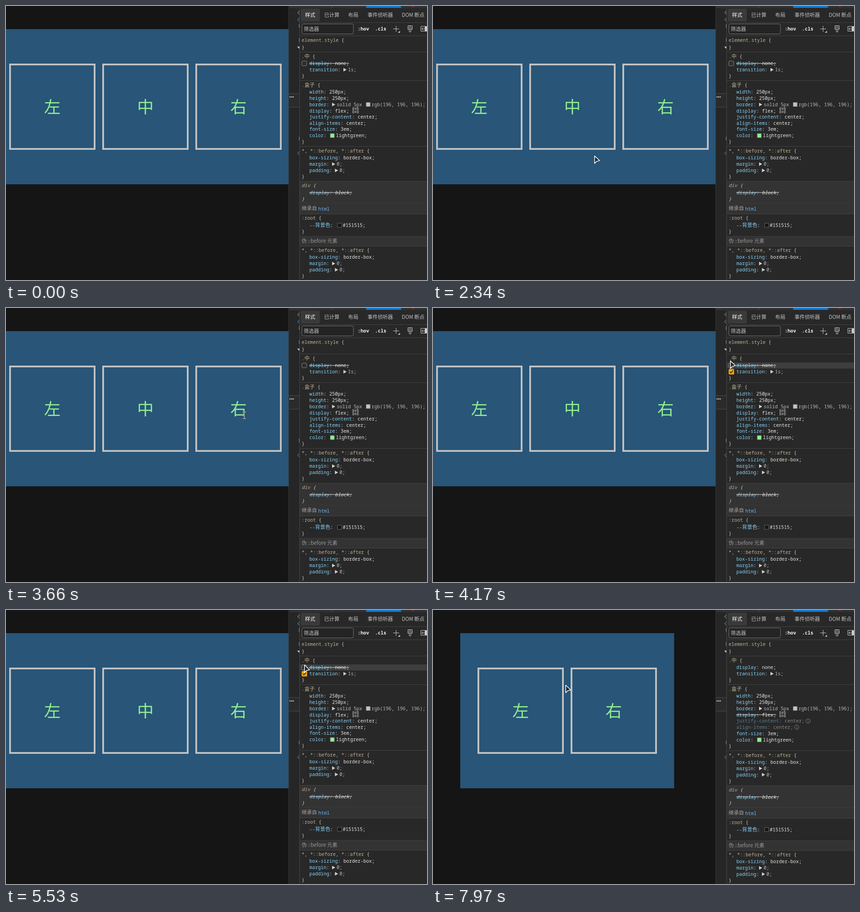
Write an HTML page that moves like this. It is 927 by 604 pixels and loops after 8000 ms.

```html
<!DOCTYPE html>
<html lang="zh">
<head>
<meta charset="utf-8">
<title>Flex boxes</title>
<style>
html, body { margin: 0; width: 100%; height: 100%; overflow: hidden; background: #151515; }
svg { display: block; width: 927px; height: 604px; }
text { white-space: pre; font: 10.42px "Noto Sans Mono", "Noto Sans CJK SC", monospace; }
.ui { font: 11.2px "Noto Sans CJK SC", "Open Sans", sans-serif; }
.han { font: 11.2px "Noto Sans CJK SC", sans-serif; }
.big { font: 36.4px "Noto Sans CJK SC", sans-serif; fill: #90ee90; text-anchor: middle; }
.struck { text-decoration: line-through; }
.bold { font-weight: 700; }
.italic { font-style: italic; }
.box rect { stroke: #c4c4c4; stroke-width: 3.8; fill: none; }
.green .side rect { fill: #556b2f; }
.gone .mid, .hover-only, .none-only, .none .flex-only { display: none; }
.none .none-only, .hover .hover-only { display: inline; }
.none.rest .checks, .hover .rest-only { display: none; }
.none .low { transform: translateY(.7px); }
</style>
</head>
<body>
<script>
const PROP = '#86d2f8', VALUE = '#e4e4e4', SOFT = '#b9b9b9', SELECTOR = '#c1b294', GREY = '#9a9a9a', LINE = '#434343';
const CH = 6.25, LEFT = 651, INDENT = 668;

const rect = (x, y, w, h, fill, more = '') => `<rect x="${x}" y="${y}" width="${w}" height="${h}" fill="${fill}" ${more}/>`;
const path = (d, stroke, more = '') => `<path d="${d}" fill="none" stroke="${stroke}" ${more}/>`;
const span = (s, fill, cls = '') => `<tspan fill="${fill}" class="${cls}">${s}</tspan>`;
const text = (x, y, s, fill = VALUE, cls = '') => `<text x="${x}" y="${y + 3.6}" fill="${fill}" class="${cls}">${s}</text>`;
const group = (cls, ...parts) => `<g class="${cls}">${parts.join('')}</g>`;
const divider = y => rect(647, y, 280, 1, LINE);
const arrow = (x, y) => `<path d="M${x} ${y - 4}l7 4l-7 4z" fill="#cfcfcf"/>`;
const swatch = (x, y, fill) => rect(x + .5, y - 4.5, 9, 9, fill, 'stroke="#777" stroke-width=".8"');
const close = (y, cls = '') => text(LEFT, y, '}', '#ccc', cls);
const open = (y, name, cls = '') => text(LEFT, y, span(name, SELECTOR) + span(' {', '#ccc'), VALUE, cls);

const prop = (y, name, value, cls = '') =>
  text(INDENT, y, span(name, PROP) + span(': ', VALUE) + span(value + ';', VALUE), '#ddd', cls);

function longhand(y, name, value) {
  const x = INDENT + (name.length + 2) * CH;
  return text(INDENT, y, span(name, PROP) + span(':', VALUE)) + arrow(x, y) + text(x + 10, y, value, SOFT);
}

const universal = y => open(y, '*, *::before, *::after') + prop(y + 15, 'box-sizing', 'border-box') +
  longhand(y + 29, 'margin', '0;') + longhand(y + 42.8, 'padding', '0;') + close(y + 57);

const checkbox = (y, on) => on
  ? rect(651, y - 6, 12, 12, '#ffa500', 'rx="2"') + path(`M653.6 ${y}l2.4 2.6l4.6-5`, '#222', 'stroke-width="1.6"')
  : rect(651.5, y - 5.3, 10.6, 10.6, '#2d2d2d', 'rx="2" stroke="#8b8b8b"');

const info = (x, y) => `<circle cx="${x}" cy="${y}" r="4.8" fill="none" stroke="#858585"/>` +
  path(`M${x} ${y - 2.6}v1M${x} ${y - .6}v3.4`, '#858585');

const dim = (y, name, value) => `<g opacity=".5">${prop(y, name, value)}</g>` + info(INDENT + (name.length + value.length + 3) * CH + 8, y);

function flexIcon(x, y) {
  let s = '';
  for (const row of [0, 7]) for (const col of [0, 5, 10]) {
    const thin = (col === 5);
    s += rect(x + col + .5, y + row + .5 + (thin ? .8 : 0), 2.4, thin ? 3.2 : 4.8, 'none', 'stroke="#b5b5b5" stroke-width=".9"');
  }
  return s;
}

const box = (cls, x, s) => group('box ' + cls, rect(x + 1.9, 128.9, 186.2, 186.2, 'none'),
  `<text class="big" x="${x + 95}" y="235.5">${s}</text>`);

const page = rect(0, 0, 622, 604, '#151515') +
  group('mid', rect(0, 51, 622, 342, '#285578'), box('side', 7, '左'), box('', 212, '中'), box('side', 417, '右')) +
  `<g id="pair">${rect(60, 51, 471, 342, '#285578')}${box('', 98, '左')}${box('', 303, '右')}</g>`;

const strip = rect(622, 0, 25, 604, '#262626') + rect(622, 0, 1, 604, '#3a3a3a') +
  rect(623, 193, 24, 30, '#2b2b2b') + rect(623, 192.5, 24, 1, '#4c4c4c') + rect(623, 222.5, 24, 1, '#4c4c4c') +
  [625.5, 629, 632.5].map(x => `<circle cx="${x}" cy="200.5" r="1.2" fill="#ddd"/>`).join('') +
  path('M646 11l-4 3.5l4 3.5', '#bbb') +
  path('M646 26.500l-4 3.500l4 3.500M646 321l-4 3.500l4 3.500', '#5aa7d8') +
  path('M645.500 40v8M645.500 71v8M645.500 288v8', '#8a8a8a') +
  '<path d="M641 89.500h6v6z" fill="#ccc"/>' + rect(646, 5, 1, 599, '#484848');

const tabs = rect(647, 0, 280, 604, '#282828') + rect(622, 0, 305, 5, '#303030') + rect(717, 0, 1, 4, '#555') +
  rect(793, 0, 77, 4, '#0f7bd6', 'rx="1.5"') + '<circle cx="896" cy="-1" r="2.500" fill="#d13438"/>' +
  rect(649, 6, 42, 28, '#3a3a3a', 'rx="3"') +
  [[658.5, '样式', '#fff'], [700.5, '已计算'], [753.5, '布局'], [796, '事件侦听器'], [871.5, 'DOM 断点']]
    .map(([x, s, c]) => text(x, 20.5, s, c || '#c4c4c4', 'ui')).join('') + divider(36) +
  rect(651.5, 39.5, 113.5, 22, '#242424', 'rx="3" stroke="#777"') + text(655.5, 51, '筛选器', '#c0c0c0', 'ui') +
  text(774.5, 50.5, ':hov', '#f2f2f2', 'bold') + text(812.5, 50.5, '.cls', '#f2f2f2', 'bold') +
  path('M852.500 50.500h13M859 44v13', '#ccc') + '<path d="M867.500 54.500v4.500h-4.500z" fill="#ccc"/>' +
  path('M885 43.500h9.500v8h-9.500zM885 48.500h9.500M888 43.500v3M891 43.500v3M888 51.500v5.500h3.500v-5.500', '#ccc') +
  path('M927 45h-13.500v10.500h13.500M922 50.500h-6M918.500 47.500l-3 3l3 3', '#ccc') + rect(922, 45, 5, 11, '#ccc') + divider(65);

const midRule = open(75, 'element.style') + close(91) + divider(101) +
  group('hover-only', rect(647, 120, 280, 13.5, '#3e3e3e')) +
  text(LEFT, 111, span('.', SELECTOR) + span('中', SELECTOR, 'han') + span(' {', '#ccc')) +
  group('none-only', prop(126.7, 'display', 'none'), group('hover-only', checkbox(126.5, true))) +
  group('flex-only', prop(126.7, 'display', 'none', 'struck'), checkbox(126.5, false)) +
  group('hover-only', checkbox(140.5, true)) +
  longhand(140.4, 'transition', '1s;') + close(154.5) + divider(164);

const boxRule = text(LEFT, 174, span('.', SELECTOR) + span('盒子', SELECTOR, 'han') + span(' {', '#ccc')) +
  prop(189.8, 'width', '250px') + prop(203.6, 'height', '250px') +
  longhand(217.2, 'border', 'solid 5px') + swatch(792.5, 217.2, '#c4c4c4') + text(804.8, 217.2, 'rgb(196, 196, 196);', SOFT) +
  group('flex-only', prop(231, 'display', 'flex'), prop(244.7, 'justify-content', 'center'), prop(258.3, 'align-items', 'center')) +
  group('none-only', prop(231, 'display', 'flex', 'struck'), dim(244.7, 'justify-content', 'center'), dim(258.4, 'align-items', 'center')) +
  flexIcon(763, 223.5);

const low = group('low',
  prop(271.8, 'font-size', '3em'),
  text(INDENT, 285.6, span('color', PROP) + span(':', VALUE)), swatch(713.5, 285.6, '#90ee90'), text(726.5, 285.6, 'lightgreen;'),
  close(299.5), divider(309), universal(319.6),
  rect(647, 386, 280, 49, '#333'), divider(386), open(395.8, 'div', 'italic'),
  prop(411.3, 'display', 'block', 'struck italic'), close(425, 'italic'), divider(434.500),
  rect(647, 435.5, 280, 23, '#333'), text(LEFT, 446.8, '继承自', '#a6a6a6', 'ui'), text(687.5, 447.3, 'html', '#6cb4f0'), divider(458),
  open(467.8, ':root'),
  text(INDENT, 483.4, span('--', PROP) + span('背景色', PROP, 'han') + span(':', VALUE)),
  swatch(729.5, 483.4, '#151515'), text(741.5, 483.4, '#151515;'), close(497.7),
  rect(647, 508, 280, 21, '#333'), divider(507.5), text(LEFT, 518.6, '伪 ::before 元素', GREY, 'ui'), divider(529),
  universal(538.8));

const pointer = `<g id="pointer">
  <path id="arrow" d="M.8.8V17.500L5 12.900L11.800 11.200Z" fill="#20262b" stroke="#fff" stroke-width="1.500" stroke-linejoin="round"/>
  <g id="beam">${path('M-3.500-7.500h2.500l1 1l1-1h2.500M0-6.500v13M-3.500 7.500h2.500l1-1l1 1h2.500', '#333', 'stroke-width="2.600"')}
  ${path('M-3.500-7.500h2.500l1 1l1-1h2.500M0-6.500v13M-3.500 7.500h2.500l1-1l1 1h2.500', '#d5d5d5', 'stroke-width="1.200"')}</g></g>`;

document.body.innerHTML = `<svg viewBox="0 0 927 604">${page}${strip}${tabs}${midRule}${boxRule}${low}${pointer}</svg>`;

// time, x, y of the pointer
const track = [
  [0, 377, 612], [490, 377, 612], [600, 372, 570], [720, 360, 480], [840, 344, 375], [950, 331, 295], [1070, 323, 242], [1220, 323, 241],
  [1400, 323, 241], [1530, 330, 270], [1700, 345, 325], [1920, 351, 355],
  [2240, 351, 355], [2340, 355, 330], [2480, 358, 285], [2620, 359, 264], [2760, 358, 263],
  [3110, 358, 263], [3230, 375, 292], [3350, 420, 322], [3470, 475, 329], [3570, 507, 295], [3660, 524.5, 237], [3780, 568, 165], [3930, 634, 108],
  [4080, 652, 112], [4250, 656, 119], [4700, 655.5, 119.5], [4830, 656.5, 120.5],
  [6910, 656.5, 120.5], [7040, 610, 88], [7180, 500, 64], [7330, 380, 90], [7480, 300, 145], [7600, 282, 190], [7730, 294, 216],
  [7850, 298, 270], [7970, 291.5, 165], [8000, 291.5, 165]
];

function pointerAt(t) {
  let i = 1;
  while (i < track.length - 1 && t >= track[i][0]) i++;
  const [a, b] = [track[i - 1], track[i]];
  const k = (t - a[0]) / (b[0] - a[0]);
  return [a[1] + (b[1] - a[1]) * k, a[2] + (b[2] - a[2]) * k];
}

const $ = id => document.getElementById(id);
const svg = document.querySelector('svg');
const within = (x, y, l, t, r, b) => x >= l && x <= r && y >= t && y <= b;
const hidden = (t, off, on, again) => (t >= off && t < on) || t >= again;

function draw(now) {
  const t = now % 8000;
  const [x, y] = pointerAt(t);
  const gone = hidden(t, 4410, 5440, 6560);
  const none = hidden(t, 4500, 5530, 6660);
  const hover = within(x, y, 647, 101, 927, 164);
  const centers = gone ? [193, 398] : [102, 307, 512];
  const beam = centers.some(c => within(x, y, c - 18, 198, c + 18, 247));
  svg.classList.toggle('gone', gone);
  svg.classList.toggle('none', none);
  svg.classList.toggle('hover', hover);
  svg.classList.toggle('green', !gone && within(x, y, 212, 127, 402, 317));
  $('pair').style.display = gone ? 'inline' : 'none';
  $('arrow').style.display = beam ? 'none' : 'inline';
  $('beam').style.display = beam ? 'inline' : 'none';
  $('pointer').setAttribute('transform', `translate(${x} ${y})`);
}

function tick() {
  draw(performance.now());
  requestAnimationFrame(tick);
}
tick();
</script>
</body>
</html>
```
